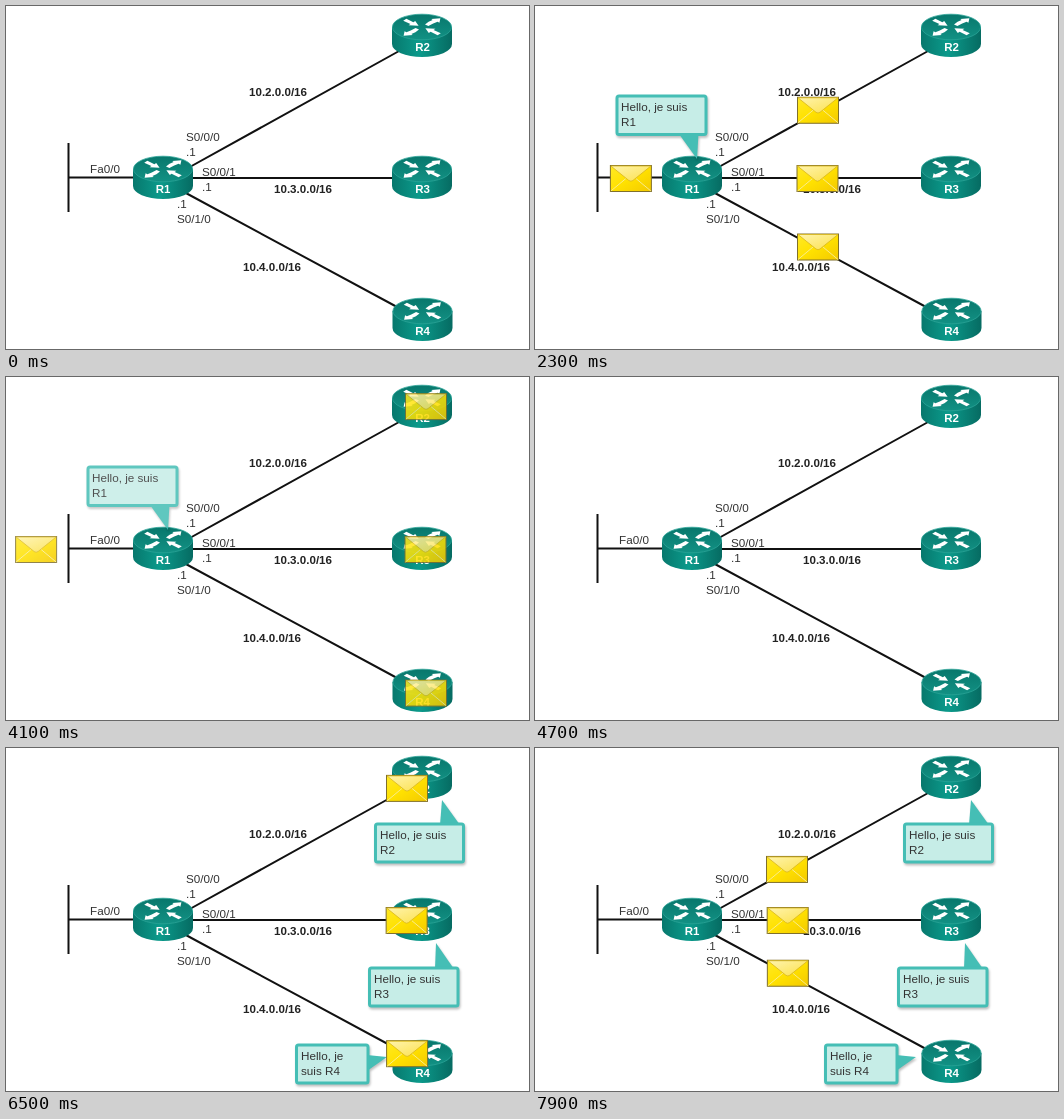
Animation of 523 by 343 pixels, one loop 8 s. Source, as an HTML page:

```html
<!DOCTYPE html>
<html lang="fr">
<head>
<meta charset="utf-8">
<title>Routeurs : messages Hello</title>
<style>
  @property --p { syntax: "<number>"; inherits: true; initial-value: 0; }

  html, body { margin: 0; width: 100%; height: 100%; overflow: hidden; background: #fff; }
  svg { display: block; width: 523px; height: 343px; }
  text { font: 11.7px "Liberation Sans", Arial, sans-serif; fill: #333; }
  .net text { font-weight: bold; font-size: 11.6px; fill: #222; }
  .name text { font-weight: bold; font-size: 11.5px; fill: #fff; text-anchor: middle; }
  .wire { fill: none; stroke: #111; stroke-width: 2; }

  .bubble { filter: drop-shadow(1px 2px 1px rgba(0, 0, 0, .25)); }
  .bubble rect { fill: #c6ede7; stroke: #45beb5; stroke-width: 3; }
  .bubble path { fill: #45beb5; }

  .hello, .out, .reply, .back { animation: 8s linear infinite; }
  .hello { animation-name: hello; }
  .out { animation-name: out-show, out-move; }
  .reply, .back { animation-name: reply; }
  .back { animation-name: reply, back-move; }

  /* x, y: start; dx, dy: shift per unit of travel */
  .mail use {
    transform: translate(calc((var(--x) + var(--dx) * var(--p)) * 1px),
                         calc((var(--y) + var(--dy) * var(--p)) * 1px));
  }

  /* The picture advances ten times a second */
  @keyframes hello {
    0% { opacity: 0; }
    5% { opacity: 0; animation-timing-function: steps(9); }
    16.25% { opacity: 1; }
    50% { opacity: 1; animation-timing-function: steps(7); }
    58.75%, 100% { opacity: 0; }
  }
  @keyframes out-show {
    0% { opacity: 0; animation-timing-function: steps(1); }
    17.5% { opacity: 1; }
    50% { opacity: 1; animation-timing-function: steps(7); }
    58.75%, 100% { opacity: 0; }
  }
  @keyframes out-move {
    0% { --p: 0; }
    17.5% { --p: 0; animation-timing-function: steps(1); }
    20% { --p: 22; animation-timing-function: steps(7); }
    28.75% { --p: 94; animation-timing-function: steps(8); }
    38.75% { --p: 178; animation-timing-function: steps(2); }
    41.25% { --p: 209; animation-timing-function: steps(3); }
    45%, 100% { --p: 231; }
  }
  @keyframes reply {
    0% { opacity: 0; }
    68.75% { opacity: 0; animation-timing-function: steps(4); }
    73.75%, 100% { opacity: 1; }
  }
  @keyframes back-move {
    0% { --p: 0; }
    80% { --p: 0; animation-timing-function: steps(1); }
    81.25% { --p: 20; animation-timing-function: steps(6); }
    88.75% { --p: 93; }
    90% { --p: 93; animation-timing-function: steps(7); }
    98.75%, 100% { --p: 169; }
  }
</style>
</head>
<body>
<svg viewBox="0 0 523 343">
  <defs>
    <linearGradient id="side">
      <stop offset="0" stop-color="#07786d"/>
      <stop offset=".45" stop-color="#0b9a8b"/>
      <stop offset="1" stop-color="#066b62"/>
    </linearGradient>
    <linearGradient id="lid" x2="0" y2="1">
      <stop offset="0" stop-color="#08776c"/>
      <stop offset="1" stop-color="#129184"/>
    </linearGradient>
    <linearGradient id="paper" x2="1" y2="1">
      <stop offset="0" stop-color="#ffe926"/>
      <stop offset=".5" stop-color="#ffe100"/>
      <stop offset="1" stop-color="#f3c900"/>
    </linearGradient>
    <linearGradient id="flap" x2="1" y2="1">
      <stop offset="0" stop-color="#fff4ae"/>
      <stop offset="1" stop-color="#fbe04a"/>
    </linearGradient>

    <path id="arrow" d="M3 -2.6L6.6 -5.3L10.6 -7L9.3 -8.1L18.4 -8.8L17.4 -4.3L15.6 -5.3L11.2 -3.4L6.4 -1Z"/>
    <path id="arrow-in" d="M-18.8 -6.2L-15.6 -8.3L-8.6 -4.8L-6.8 -6L-3.4 -1.2L-13.4 -1.7L-11.6 -3Z"/>
    <g id="router">
      <path d="M-30 0V17A30 13 0 0 0 30 17V0Z" fill="url(#side)"/>
      <ellipse rx="29.6" ry="12.8" fill="url(#lid)" stroke="#2ba497" stroke-width=".8"/>
      <g fill="#fff">
        <use href="#arrow"/>
        <use href="#arrow" transform="rotate(180)"/>
        <use href="#arrow-in"/>
        <use href="#arrow-in" transform="rotate(180)"/>
      </g>
    </g>
    <g id="mail">
      <rect x=".5" y=".5" width="41" height="26" fill="url(#paper)" stroke="#80702c"/>
      <path d="M1 26L16 13.5M41 26L26 13.5" stroke="#f9ec8c" fill="none"/>
      <path d="M1 1H41L23 15.5Q21 17 19 15.5Z" fill="url(#flap)" stroke="#d9b51c" stroke-width=".8"/>
    </g>
  </defs>

  <rect width="523" height="343" fill="#fff"/>
  <path class="wire" d="M62.5 137V206M62 171.5H130M184 172H390M182 162L394 44.5M178 186L392 301.5"/>

  <use href="#router" x="157" y="163"/>
  <use href="#router" x="416" y="21"/>
  <use href="#router" x="416" y="163"/>
  <use href="#router" x="416.5" y="305"/>

  <g class="name">
    <text x="157" y="187">R1</text>
    <text x="416.5" y="45">R2</text>
    <text x="416.5" y="187">R3</text>
    <text x="416.5" y="329">R4</text>
  </g>
  <text x="84" y="167">Fa0/0</text>
  <text x="180" y="135">S0/0/0</text>
  <text x="180" y="150">.1</text>
  <text x="196" y="170">S0/0/1</text>
  <text x="196" y="185">.1</text>
  <text x="171" y="202">.1</text>
  <text x="171" y="217">S0/1/0</text>
  <g class="net">
    <text x="243" y="90">10.2.0.0/16</text>
    <text x="268" y="187">10.3.0.0/16</text>
    <text x="237" y="265">10.4.0.0/16</text>
  </g>

  <g class="hello">
    <g class="bubble">
      <path d="M144 128L162 153L163.500 128Z"/>
      <rect x="82" y="90" width="89" height="38.500" rx="2"/>
    </g>
    <text x="86" y="105">Hello, je suis</text>
    <text x="86" y="120">R1</text>
  </g>
  <g class="mail out">
    <use href="#mail" style="--x:120;--y:159;--dx:-.48;--dy:0"/>
    <use href="#mail" style="--x:168;--y:142;--dx:1;--dy:-.545"/>
    <use href="#mail" style="--x:167.500;--y:159;--dx:1;--dy:0"/>
    <use href="#mail" style="--x:168;--y:176;--dx:1;--dy:.548"/>
  </g>

  <g class="reply">
    <g class="bubble">
      <path d="M434 77L436 52L454 77Z"/>
      <rect x="369.500" y="76" width="88" height="38" rx="2"/>
    </g>
    <text x="374" y="91">Hello, je suis</text>
    <text x="374" y="106">R2</text>
    <g class="bubble">
      <path d="M429 221L430 195L448 221Z"/>
      <rect x="363.500" y="220" width="88.500" height="38" rx="2"/>
    </g>
    <text x="368" y="235">Hello, je suis</text>
    <text x="368" y="250">R3</text>
    <g class="bubble">
      <path d="M361 307L381 309L361 323Z"/>
      <rect x="290.500" y="297" width="71.500" height="38" rx="2"/>
    </g>
    <text x="295" y="312">Hello, je</text>
    <text x="295" y="327">suis R4</text>
  </g>
  <g class="mail back">
    <use href="#mail" style="--x:400;--y:16;--dx:-1;--dy:.544"/>
    <use href="#mail" style="--x:399.500;--y:159;--dx:-.993;--dy:0"/>
    <use href="#mail" style="--x:400;--y:303;--dx:-.995;--dy:-.54"/>
  </g>
</svg>
</body>
</html>
```
